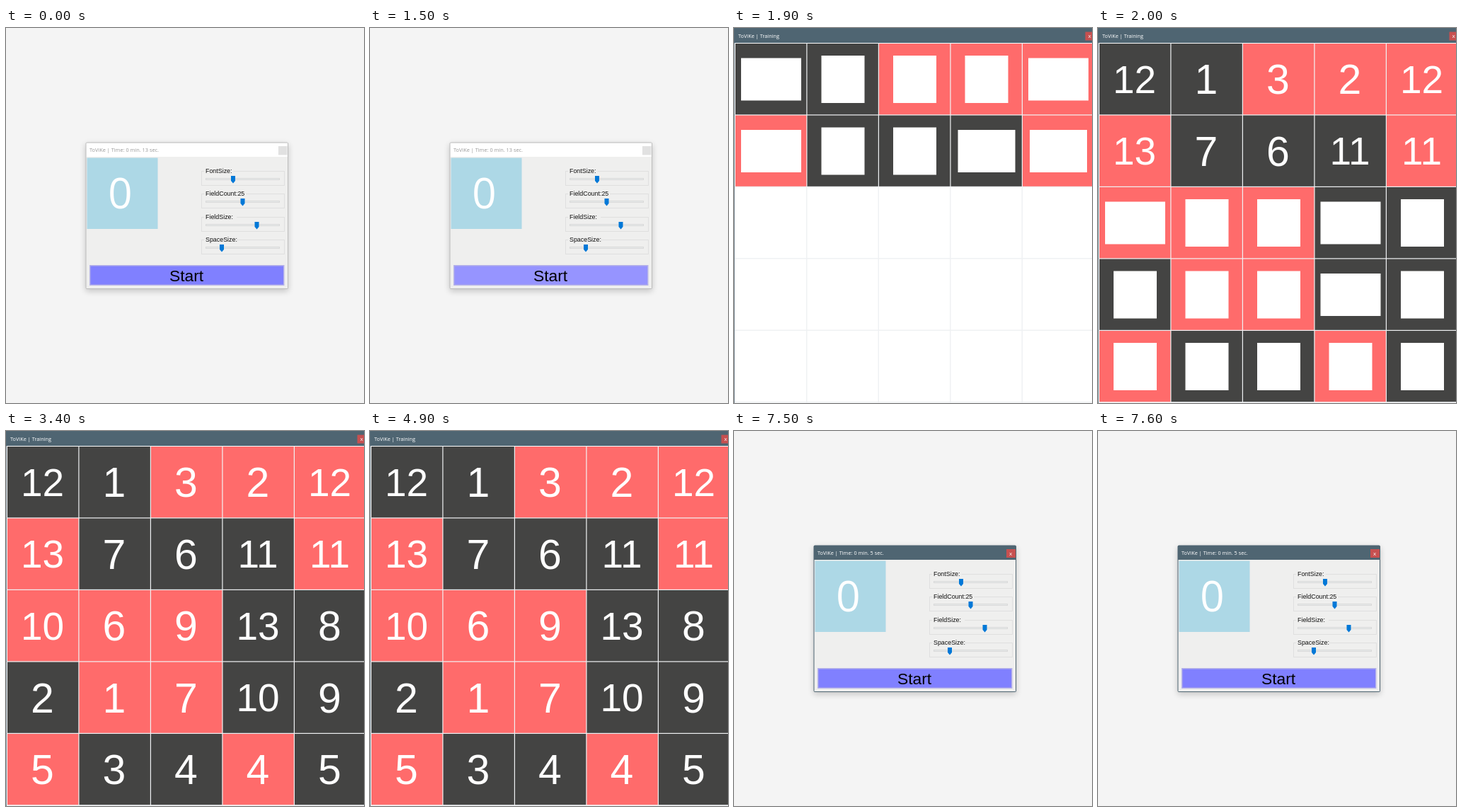
An HTML page with a canvas for the animation above (8000 ms loop, 506 by 530 pixels).

```html
<!DOCTYPE html>
<html lang="en">
<head>
<meta charset="utf-8">
<title>Number table training</title>
<style>
  html, body { margin: 0; width: 100%; height: 100%; overflow: hidden; background: #f4f4f4; }
  canvas { display: block; }
</style>
</head>
<body>
<canvas id="stage" width="506" height="530"></canvas>
<script>
const ctx = document.getElementById('stage').getContext('2d');
const LOOP = 8000;
const APP = 'ToViKe';
const UI = '"Open Sans", "Noto Sans", sans-serif';
const ARIAL = '"Liberation Sans", Arial, sans-serif';
const BAR = '#4f6572', RED = '#ff6b6b', DARK = '#444443';

// Negative numbers stand on red cells.
const GRID = [
  [12, 1, -3, -2, -12],
  [-13, 7, 6, 11, -11],
  [-10, -6, -9, 13, 8],
  [2, -1, -7, 10, 9],
  [-5, 3, 4, -4, 5]
];
const SLIDERS = [['FontSize:', 321], ['FieldCount:25', 334.5], ['FieldSize:', 354.5], ['SpaceSize:', 305]];

function rect(x, y, w, h, color) {
  ctx.fillStyle = color;
  ctx.fillRect(x, y, w, h);
}

function text(str, x, y, size, color, font = ARIAL, align = 'left') {
  ctx.font = `${size}px ${font}`;
  ctx.textAlign = align;
  ctx.fillStyle = color;
  ctx.fillText(str, x, y);
}

function closeButton(x, y) {
  rect(x, y, 13, 12, '#c75050');
  text('x', x + 6, y + 8.5, 8, '#fff', UI, 'center');
}

function slider(label, thumb, y) {
  ctx.strokeStyle = '#dfdfdf';
  ctx.lineWidth = 1;
  ctx.strokeRect(276.5, y + .5, 117, 20);
  rect(280, y - 4, label.length * 4.4 + 2, 9, '#efefee');
  text(label, 282, y + 3, 8.9, '#111');
  rect(282, y + 10, 105, 3, '#d9d9d9');
  rect(283, y + 11, 103, 1, '#e8ebeb');
  ctx.fillStyle = '#0078d7';
  ctx.beginPath();
  for (const [dx, dy] of [[-3, 7], [3, 7], [3, 14], [0, 17.5], [-3, 14]]) ctx.lineTo(thumb + dx, y + dy);
  ctx.fill();
}

function drawSettings(active, seconds, hover) {
  ctx.save();
  ctx.shadowColor = 'rgba(0,0,0,.2)';
  ctx.shadowBlur = 8;
  ctx.shadowOffsetY = 3;
  ctx.fillStyle = active ? BAR : '#bcbcbc';
  ctx.beginPath();
  ctx.roundRect(112.5, 161.5, 286.5, 207.5, 2);
  ctx.fill();
  ctx.restore();
  rect(113.5, 162.5, 284.5, 20, active ? BAR : '#fff');
  rect(113.5, 182, 284.5, 186, '#efefee');

  text(`${APP} | Time: 0 min. ${seconds} sec.`, 118, 175, 7.35, active ? '#fff' : '#999', UI);
  if (active) closeButton(385, 167);
  else rect(385, 167, 12.5, 12.5, '#e1e1e1');

  rect(114.5, 183.5, 100, 100.5, '#add8e6');
  text('0', 161.5, 254.5, 60, '#fff', UI, 'center');
  SLIDERS.forEach(([label, thumb], i) => slider(label, thumb, Math.round(202 + i * 32.3)));

  rect(118, 335, 275.5, 29, '#b5b2e8');
  rect(119.5, 336.5, 272.5, 26, hover ? '#9694ff' : '#8080ff');
  text('Start', 255, 358, 22.8, '#000', ARIAL, 'center');
}

function drawCell(value, row, col, showNumber) {
  const x = 2 + col * 101.5, y = 22 + row * 101.5;
  const cx = x + 50.5, cy = y + 50.5;
  const label = String(Math.abs(value));
  const wide = label.length > 1;
  rect(x, y, 100.3, 100.3, value < 0 ? RED : DARK);
  if (showNumber) {
    const size = wide ? 55 : 59;
    text(label, cx - 1, cy + size * .35, size, '#fff', ARIAL, 'center');
  } else {
    const w = wide ? (label === '11' ? 81 : 85) : 61, h = wide ? 60 : 67;
    rect(cx - w / 2, cy - h / 2, w, h, '#fff');
  }
}

function drawTraining(painted, numbered) {
  rect(0, 0, 506, 530, '#fff');
  for (let i = 1; i <= 5; i++) {
    rect(i * 101.5 + .5, 21, 1.5, 509, '#eff1f3');
    rect(1, i * 101.5 + 20.5, 505, 1.5, '#eff1f3');
  }
  GRID.flat().slice(0, painted).forEach((value, i) =>
    drawCell(value, Math.floor(i / 5), i % 5, i < numbered));
  rect(0, 0, 506, 21, BAR);
  rect(0, 21, 1, 509, '#7b8992');
  text(`${APP} | Training`, 6, 13.5, 7.35, '#fff', UI);
  closeButton(496.5, 5.5);
}

function draw(now) {
  const t = now % LOOP;
  rect(0, 0, 506, 530, '#f4f4f4');
  if (t < 1700) drawSettings(false, 13, t >= 1500);
  else if (t >= 7500) drawSettings(true, 5, false);
  else if (t < 1800) {
    ctx.globalAlpha = .6;
    drawTraining(0, 0);
    ctx.globalAlpha = 1;
  }
  else if (t < 1900) drawTraining(0, 0);
  else if (t < 2000) drawTraining(10, 0);
  else if (t < 2100) drawTraining(25, 10);
  else drawTraining(25, 25);
}

const start = performance.now();
function tick() {
  draw(performance.now() - start);
  requestAnimationFrame(tick);
}
tick();
</script>
</body>
</html>
```
